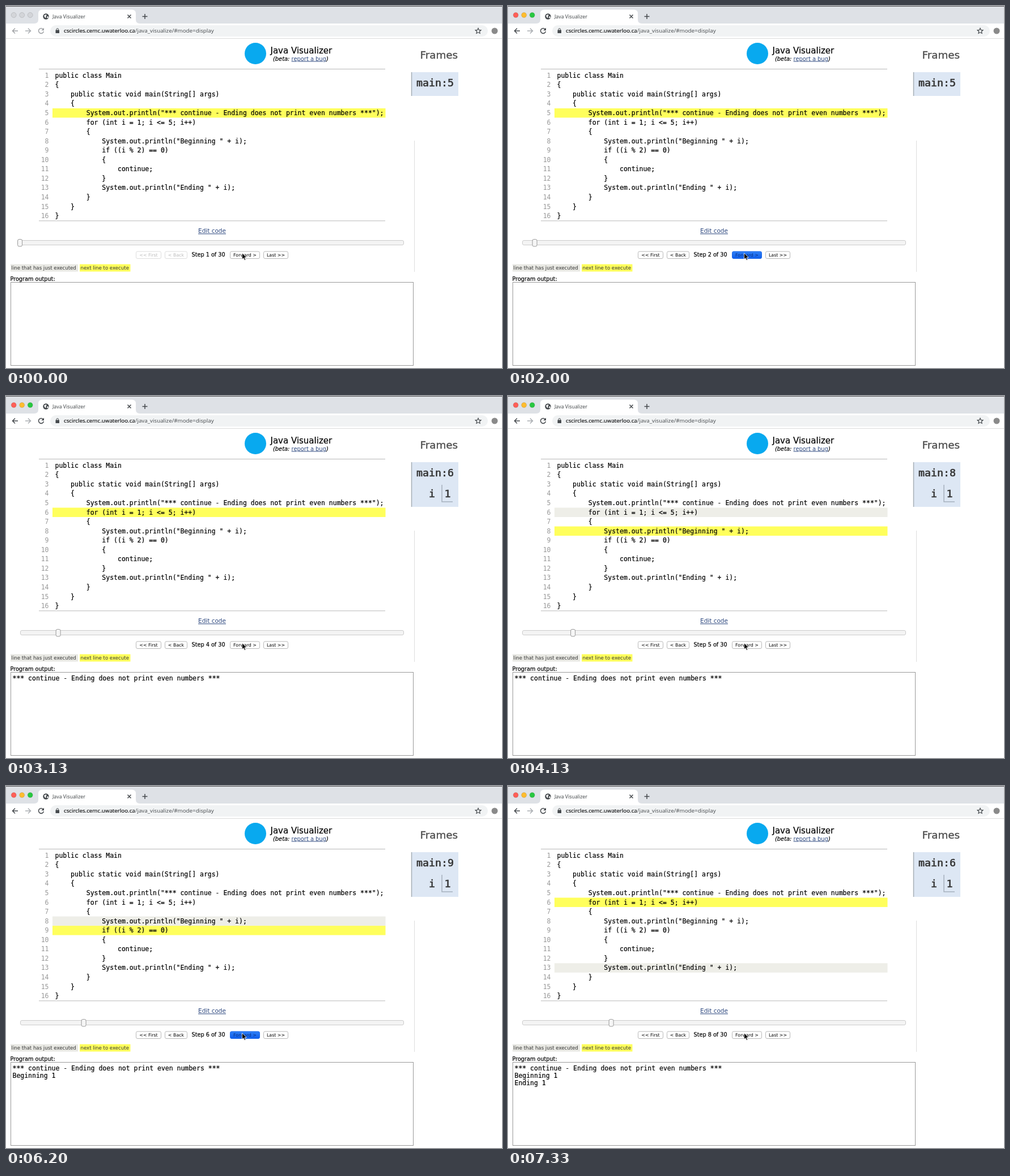
An HTML page that plays this animation: 875 by 640 pixels, repeating every 8 s.

```html
<!DOCTYPE html>
<html lang="en">
<head>
<meta charset="utf-8">
<title>Java Visualizer</title>
<style>
html, body { margin: 0; width: 100%; height: 100%; overflow: hidden; background: #fff; }
svg { display: block; font-family: "DejaVu Sans", sans-serif; }
text { white-space: pre; }
.mono { font-family: "DejaVu Sans Mono", monospace; font-size: 11.47px; }
.ui { font-family: "Open Sans", sans-serif; }
.link { fill: #2f4a80; text-decoration: underline; }
.dark { stroke: #000; stroke-width: .2; }
.line { fill: none; stroke-width: 1.5; }
.frame { fill: #333; font-size: 18.3px; stroke: #333; stroke-width: .55; }
.button rect { fill: #fff; stroke: #b8b8b8; }
.button text { font-size: 7.9px; text-anchor: middle; }
.button.off rect { stroke: #ddd; }
.button.off text { fill: #bbb; }
.button.down rect { fill: url(#blue); stroke: #1d69ea; }
.button.down text { fill: #08307f; }
</style>
</head>
<body>
<svg width="875" height="640" viewBox="0 0 875 640">
  <defs>
    <linearGradient id="blue" x2="0" y2="1">
      <stop stop-color="#2f80f7"/><stop offset="1" stop-color="#0f5dea"/>
    </linearGradient>
  </defs>

  <!-- browser bar -->
  <path fill="#dee1e6" d="M0 0H875V31H0z"/>
  <path fill="#555" d="M0 0H875V1H0z"/>
  <path fill="#fff" d="M50 31Q57 31 57 24V13Q57 6.500 64 6.500H222Q229 6.500 229 13V24Q229 31 236 31z"/>
  <g id="lights" stroke="#000" stroke-opacity=".12"><circle cx="13.700" cy="16" r="4.500"/><circle cx="28.200" cy="16" r="4.500"/><circle cx="42.700" cy="16" r="4.500"/></g>
  <circle cx="70.500" cy="18.500" r="5.200" fill="#45494d"/>
  <path fill="#fff" d="M67 17l3-2 2 1-2 2 1 2-2 1zM72 19l2-1 1 2-2 2z"/>
  <text class="ui" x="82" y="21.500" font-size="8.800" fill="#3c4043">Java Visualizer</text>
  <path class="line" stroke="#45494d" d="M214.500 15.500l6 6m0-6l-6 6M240.500 18.500h9m-4.500-4.500v9"/>
  <rect x="78" y="34" width="772" height="20" rx="10" fill="#f1f3f4"/>
  <path id="back" class="line" d="M21 44H11.500M16 39.500L11.500 44l4.500 4.500"/>
  <path class="line" stroke="#a9adb1" d="M34 44H43.500M39 39.500l4.500 4.500-4.500 4.500"/>
  <g id="reload"><path class="line" d="M65.300 40.800A4.500 4.500 0 1 0 66.400 45"/><path d="M67 38.500v4.700h-4.700z" stroke="none"/></g>
  <path fill="#45494d" d="M87.500 42.500h6.500v5.500h-6.500z"/>
  <path class="line" stroke="#45494d" style="stroke-width:1" d="M89 43v-1.500a1.800 1.800 0 0 1 3.600 0V43"/>
  <text class="ui" x="102" y="47.300" font-size="9.800" fill="#45494d"><tspan class="dark" fill="#202124">cscircles.cemc.uwaterloo.ca</tspan>/java_visualize/#mode=display</text>
  <path class="line" stroke="#45494d" style="stroke-width:1.200" d="M833 39.200l1.400 3.200 3.500.3-2.600 2.300.8 3.400-3.100-1.800-3.100 1.800.8-3.400-2.600-2.300 3.500-.3z"/>
  <circle cx="862" cy="44" r="5.500" fill="#8a8a8a"/>
  <path fill="#dcdcdc" d="M0 57H875v1H0z"/>

  <!-- page header -->
  <circle cx="440" cy="84" r="19" fill="#08a9ef"/>
  <text class="dark" x="466.500" y="84" font-size="15">Java Visualizer</text>
  <text x="471" y="96.500" font-size="9.900"><tspan class="dark" font-style="italic">(beta: </tspan><tspan class="link">report a bug</tspan><tspan class="dark" font-style="italic">)</tspan></text>

  <!-- code -->
  <path stroke="#b9b9b9" d="M58 111.500H669M58 379.800H669"/>
  <rect id="prev" x="82" width="587.500" height="16.500" fill="#eeeee8"/>
  <rect id="next" x="82" width="587.500" height="16.500" fill="#ffff5c"/>
  <g id="code" class="mono"></g>
  <text class="link" x="339" y="401.300" font-size="10.500">Edit code</text>

  <!-- controls -->
  <rect x="25.500" y="414.500" width="676" height="8" rx="2.500" fill="#f4f4f4" stroke="#ccc"/>
  <rect id="knob" y="412.500" width="8" height="12.500" rx="2.500" fill="#f6f6f6" stroke="#999"/>
  <g id="buttons"></g>
  <text id="step" class="dark" x="327.500" y="443.300" font-size="9.700"></text>
  <path stroke="#fff" stroke-width=".8" d="M416.500 436.800v11l2.600-2.300 1.700 4 1.900-.8-1.700-3.900h3.500z"/>
  <path fill="#e8e8e3" d="M8 456.500H127v13H8z"/>
  <path fill="#ffff5c" d="M130 456.500h89.500v13H130z"/>
  <g font-size="8.600" fill="#333">
    <text x="9.500" y="466">line that has just executed</text>
    <text x="131.500" y="466">next line to execute</text>
  </g>
  <text class="dark" x="7.500" y="486" font-size="9.700">Program output:</text>
  <rect x="8.500" y="488.500" width="710" height="147" fill="#fff" stroke="#999"/>
  <g id="output" class="mono dark"></g>

  <!-- stack -->
  <path stroke="#ddd" d="M720.500 238V470"/>
  <rect id="box" x="715" y="117" fill="#dde7f4"/>
  <path id="edge" stroke="#a5afb5" stroke-width="1.500"/>
  <text class="mono frame" id="call" x="724" y="142"></text>
  <g id="right">
    <text x="730.500" y="92.500" font-size="18.300" fill="#505050" stroke="#505050" stroke-width=".4">Frames</text>
    <g id="local">
      <text class="mono frame" x="746" y="178.500">i</text>
      <text class="mono frame" x="773.500" y="178.500">1</text>
      <path class="line" stroke="#a5b1bd" d="M769 157V187H788"/>
    </g>
  </g>
</svg>
<script>
const LOOP = 8000, ROW = 16.55;
const code = `public class Main
{
    public static void main(String[] args)
    {
        System.out.println("*** continue - Ending does not print even numbers ***");
        for (int i = 1; i <= 5; i++)
        {
            System.out.println("Beginning " + i);
            if ((i % 2) == 0)
            {
                continue;
            }
            System.out.println("Ending " + i);
        }
    }
}`.split('\n');
const printed = ['*** continue - Ending does not print even numbers ***', 'Beginning 1', 'Ending 1'];
const presses = [1000, 2000, 2930, 3930, 5130, 6200, 7200];
const releases = [1200, 2200, 3130, 4130, 5330, 6400, 7330];
// per step: executed line, next line, printed lines
const steps = [[0, 5, 0], [0, 5, 0], [5, 6, 1], [0, 6, 1], [6, 8, 1], [8, 9, 2], [9, 13, 2], [13, 6, 3]];

const $ = id => document.getElementById(id);
function add(parent, tag, attrs, text = '') {
  const el = document.createElementNS('http://www.w3.org/2000/svg', tag);
  set(el, attrs);
  el.textContent = text;
  return parent.appendChild(el);
}
function set(el, attrs) {
  for (const key in attrs) el.setAttribute(key, attrs[key]);
}
const show = (el, on) => set(el, { visibility: on ? 'visible' : 'hidden' });

code.forEach((line, k) => {
  const y = 126.8 + k * ROW;
  add($('code'), 'text', { x: 75.5, y, fill: '#999', 'text-anchor': 'end' }, k + 1);
  add($('code'), 'text', { x: 86.5, y, class: 'dark' }, line);
});
const outputs = printed.map((line, k) => add($('output'), 'text', { x: 11.5, y: 502.5 + k * 13 }, line));
const buttons = [['<< First', 229, 45], ['< Back', 280, 40], ['Forward >', 395, 53], ['Last >>', 454, 44]]
  .map(([label, x, width]) => {
    const g = add($('buttons'), 'g', { class: 'button' });
    add(g, 'rect', { x: x + .5, y: 434, width: width - 1, height: 12.5, rx: 2.5 });
    add(g, 'text', { x: x + width / 2, y: 443 }, label);
    return g;
  });

function highlight(el, line) {
  show(el, line);
  set(el, { y: 114.7 + (line - 1) * ROW });
}

function draw(t) {
  const passed = times => times.filter(at => t >= at).length;
  const done = passed(releases), down = passed(presses) > done;
  const [prev, next, lines] = steps[done];
  const active = t >= 130, local = done > 2;

  const colors = ['#ff5f57', '#febc2e', '#28c840'];
  [...$('lights').children].forEach((c, k) => set(c, { fill: active ? colors[k] : '#d3d5d9' }));
  const ink = active ? '#45494d' : '#a0a3a6';
  set($('back'), { stroke: ink });
  set($('reload'), { stroke: ink, fill: ink });

  highlight($('prev'), prev);
  highlight($('next'), next);
  outputs.forEach((el, k) => show(el, k < lines));
  set($('knob'), { x: 20.6 + done * 22.5 });
  $('step').textContent = `Step ${done + 1} of 30`;
  buttons.forEach((b, k) => {
    const state = k < 2 && !done ? ' off' : k == 2 && down ? ' down' : '';
    set(b, { class: 'button' + state });
  });

  const shift = next > 9 ? 11.5 : 0, height = local ? 79 : 42;
  set($('box'), { width: 83 + shift, height });
  set($('edge'), { d: `M715.5 117v${height}` });
  $('call').textContent = 'main:' + next;
  set($('right'), { transform: `translate(${shift})` });
  show($('local'), local);
}

const start = performance.now();
function tick() {
  draw((performance.now() - start) % LOOP);
  requestAnimationFrame(tick);
}
tick();
</script>
</body>
</html>
```
